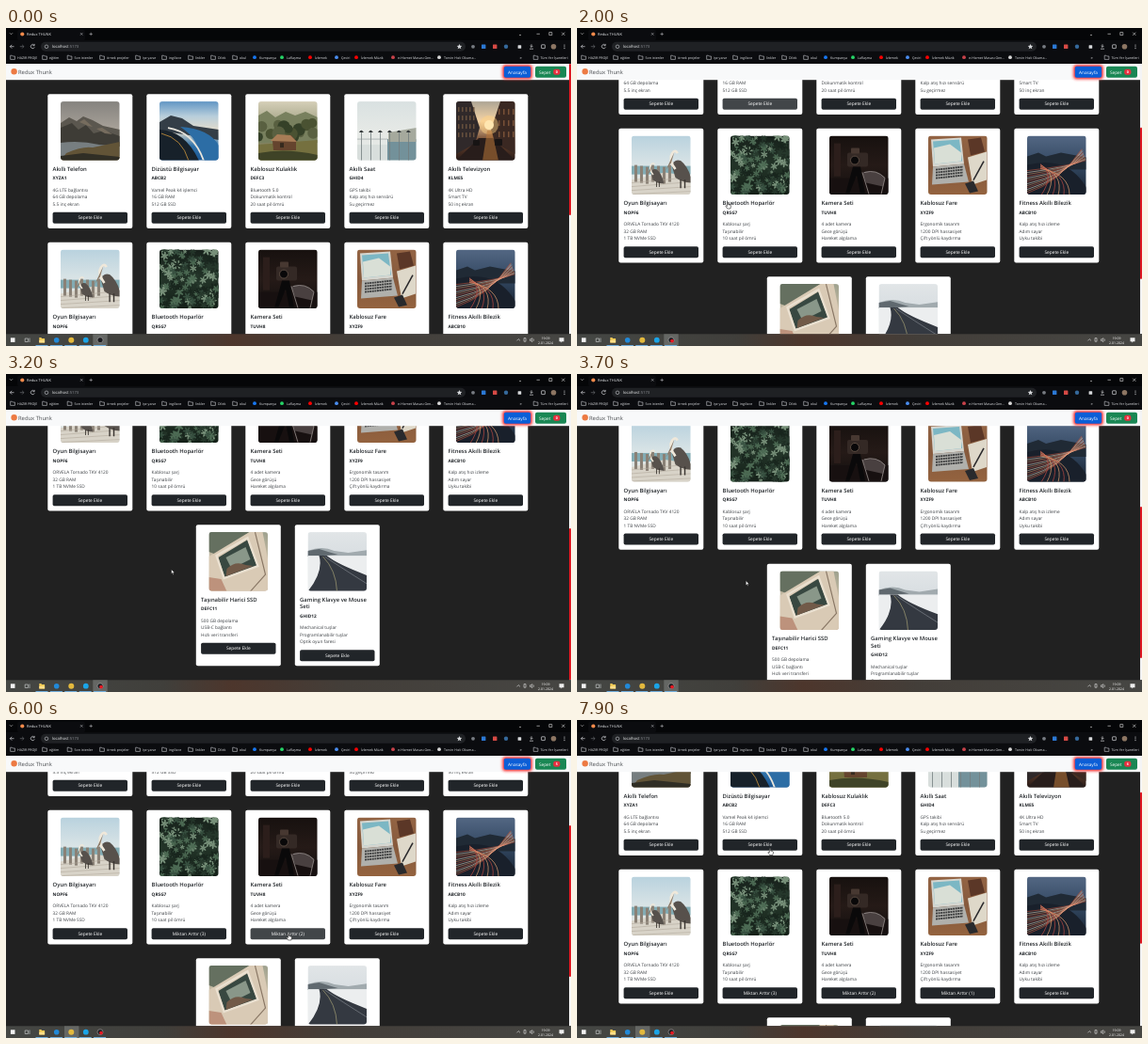
Write an HTML page that moves like this. It is 600 by 338 pixels and loops after 8 s.

```html
<!DOCTYPE html>
<html lang="tr">
<head>
<meta charset="utf-8">
<title>Redux Thunk</title>
<style>
html, body { margin: 0; width: 100%; height: 100%; overflow: hidden; background: #000; }
svg { display: block; width: 600px; height: 338px; font-family: "Open Sans", "Noto Sans", sans-serif; text-rendering: geometricPrecision; }
</style>
</head>
<body>
<svg id="stage" viewBox="0 0 600 338"></svg>
<script>
const LOOP = 8000, STEP = 100;

// Markup helpers
const rect = (x, y, w, h, fill, r = 0, more = '') =>
  `<rect x="${x}" y="${y}" width="${w}" height="${h}" fill="${fill}" rx="${r}" ${more}/>`;
const dot = (x, y, r, fill, more = '') => `<circle cx="${x}" cy="${y}" r="${r}" fill="${fill}" ${more}/>`;
const shape = (fill, d, more = '') => `<path d="${d}" fill="${fill}" ${more}/>`;
const line = (color, d, w = 0.7, more = '') =>
  `<path d="${d}" fill="none" stroke="${color}" stroke-width="${w}" ${more}/>`;
const text = (x, y, size, fill, str, more = '') =>
  `<text x="${x}" y="${y}" font-size="${size}" fill="${fill}" ${more}>${str}</text>`;
const many = (n, fn) => Array.from({ length: n }, (_, i) => fn(i)).join('');

let gradients = '', gradientCount = 0;
function fade(...colors) {
  const id = 'g' + gradientCount++;
  const stops = colors.map((c, i) => `<stop offset="${i / (colors.length - 1)}" stop-color="${c}"/>`).join('');
  gradients += `<linearGradient id="${id}" x2="0" y2="1">${stops}</linearGradient>`;
  return rect(0, 0, 63, 63, `url(#${id})`);
}

let seed = 7;
const rnd = () => (seed = (seed * 16807) % 2147483647) / 2147483647;

// Simple scenes, each 62.5 units square
const leaf = () => {
  const x = rnd() * 63, y = rnd() * 63, r = 1.5 + rnd() * 3, turn = rnd() * 60;
  const green = ['#26382c', '#375040', '#4d6b54', '#78917a', '#18251d'][Math.floor(rnd() * 5)];
  return `<g transform="translate(${x} ${y}) rotate(${turn})">` + many(6, i =>
    `<ellipse cx="${r * 0.6}" rx="${r * 0.6}" ry="${r * 0.24}" fill="${green}" transform="rotate(${i * 60})"/>`) + '</g>';
};
const pelican = (x, y, s) => `<g transform="translate(${x} ${y}) scale(${s})">` +
  shape('#57514c', 'M1 18Q2 10 9 12Q17 18 20 33Q11 33 4 28Z') +
  line('#efe8da', 'M4 20Q-3 11 1 5Q4 1 6 5', 2.4) +
  shape('#8d7a67', 'M3 4L-5 21L0 14Z') + line('#35302c', 'M9 30V38M13 30V38', 1.2) + '</g>';

const photos = [
  fade('#85837f', '#aaa39a', '#b1a79b') +
    shape('#5b574f', 'M0 23L9 17L17 21L24 16L34 20L45 26L63 30V48H0Z') +
    shape('#3e3c36', 'M0 28L12 23L19 30L27 25L35 34L46 31L63 37V48H0Z') +
    shape('#766c5e', 'M20 22L25 19L34 27L29 26ZM38 29L44 28L55 35L47 34Z') +
    shape('#777e80', 'M0 44Q20 41 41 46L63 48V58H0Z') +
    shape('#625437', 'M6 55Q24 47 34 49L63 43V63H0Z') + shape('#302e25', 'M0 58L24 55L63 59V63H0Z'),
  fade('#6296c4', '#b8cedb', '#e4dccb', '#2f72aa', '#1b5590') +
    shape('#343e47', 'M0 22L12 15L24 18L36 26L63 30V41L0 31Z') +
    shape('#2c6da5', 'M22 27Q53 29 63 47V63H46Q42 40 22 27Z') +
    shape('#17212a', 'M0 30Q27 31 42 63H0Z') +
    line('#e8e5dc', 'M9 28Q36 32 47 63', 1.8) + line('#cf963d', 'M2 34Q24 39 31 63', 0.8),
  fade('#d5cfb8', '#929474', '#6c6843') +
    shape('#78805e', 'M0 15L9 10L18 17L29 11L39 15L50 11L63 17V44H0Z') +
    many(18, i => dot(rnd() * 63, 22 + rnd() * 17, 4 + rnd() * 3, ['#354128', '#4a5232', '#596041'][i % 3])) +
    shape('#75703f', 'M0 46L63 41V63H0Z') + shape('#65442e', 'M15 42L20 36H35L40 42V52H16Z') +
    shape('#a77c56', 'M13 42L20 35L34 36L41 43Z') + rect(23, 44, 4, 5, '#35291e') +
    shape('#3f4327', 'M0 55Q29 49 63 57V63H0Z'),
  fade('#d9e1e1', '#e6e9e6', '#e2e6e3') + rect(32, 40, 31, 23, '#73919a') +
    shape('#a5a99d', 'M33 33L63 28V43H33Z') + rect(0, 46, 32, 17, '#d8dedc') +
    many(6, i => rect(4 + i * 10, 33, 0.8, 30, '#747d7f') + shape('#353a3b', `M${2 + i * 10} 33q2 -4 4 -1l1 1z`)) +
    line('#8c9496', 'M0 40H32', 0.6),
  fade('#ada595', '#f5d3a4', '#6b432d', '#261a18') +
    shape('#30292a', 'M0 0H16L25 28L20 45L0 56Z') + shape('#3a2822', 'M63 0H47L37 30L41 44L63 56Z') +
    dot(35, 25, 5, '#fff7d7') + dot(35, 25, 10, '#ffd180', 'opacity=".45"') +
    shape('#281d1b', 'M24 39H39L63 63H0Z') + shape('#b97739', 'M33 31H38L45 63H28Z', 'opacity=".55"') +
    many(20, i => rect(2 + i % 5 * 4, 6 + Math.floor(i / 5) * 9, 1.5, 5, '#67503d')) +
    many(12, i => rect(45 + i % 4 * 5, 8 + Math.floor(i / 4) * 12, 1.5, 6, '#795137')) +
    rect(18, 41, 7, 6, '#171414', 1) + rect(41, 40, 8, 7, '#171414', 1),
  fade('#b9d2de', '#dae4e6', '#e3e4df') + rect(0, 32, 63, 9, '#82abb3') +
    shape('#d8d3c8', 'M0 47L35 39L63 43V63H0Z') +
    many(7, i => rect(3 + i * 6, 31 + i % 3, 3, 18, '#8a8176')) +
    many(5, i => line('#b3aa9d', `M0 ${50 + i * 4}L63 ${44 + i * 5}`, 0.6)) +
    pelican(20, 27, 0.72) + pelican(42, 13, 1.12),
  fade('#17211b', '#233428', '#142018') + many(160, leaf),
  fade('#17110f', '#251a17', '#110e0e') + rect(0, 45, 63, 18, '#171010') +
    rect(19, 18, 22, 15, '#342925', 2) + dot(27, 26, 4.5, '#090809', 'stroke="#5a4b41"') +
    rect(23, 13, 9, 6, '#473831', 1) + shape('#0a090a', 'M25 33H33L38 62H33L29 42L21 62H17Z') +
    shape('#494040', 'M35 39Q48 35 59 44L57 54L39 50Z') + line('#8d8583', 'M35 39L42 62M37 39Q50 35 59 45L55 62', 0.9) +
    rect(5, 8, 7, 35, '#2c1e1b'),
  fade('#936444', '#865a3d', '#94633f') +
    shape('#d5d6d0', 'M3 4L35 2L38 30L5 33Z') + shape('#7cb7c4', 'M5 6L33 4L36 27L7 30Z') +
    shape('#d9dfd6', 'M6 13L23 9L35 18V27L7 30Z') + shape('#b0b0ac', 'M5 33L38 30L43 49L4 52Z') +
    many(4, i => line('#393a3b', `M8 ${36 + i * 3}L37 ${33 + i * 3}`, 1.8, 'stroke-dasharray="2 .6"')) +
    shape('#ded8c9', 'M42 23L62 17V47L47 52Z') + shape('#5b3727', 'M42 4L56 2L60 17L45 21Z') +
    line('#28272a', 'M48 47L59 27', 1.5) + shape('#292a2d', 'M39 51L48 48L53 59L44 61Z'),
  fade('#536783', '#324761', '#18222f') +
    shape('#202a35', 'M0 22L12 18L20 22L36 18L63 23V36H0Z') + shape('#19202b', 'M0 31Q42 20 63 55V63H0Z') +
    many(13, i => line(['#c2533d', '#df9165', '#f2ddc5'][i % 3],
      `M0 ${61 - i * 2}Q${34 + i} ${50 - i * 1.5} ${58 + i * 0.4} ${14 + i}`, 0.55)) +
    many(6, i => line(['#bd4a44', '#e2a070'][i % 2], `M${15 + i * 6} 63Q${30 + i * 3} 40 14 ${30 + i}`, 0.7)),
  fade('#9ea18e', '#cec1aa', '#bda58b') + shape('#657060', 'M0 0H43L8 24L0 21Z') +
    shape('#d9cab5', 'M0 26L43 0H57L63 31V63H0Z') + shape('#384841', 'M10 27L41 8L51 36L17 48Z') +
    shape('#899789', 'M18 27L39 16L44 29L24 39Z') + line('#eae0d0', 'M8 25L41 6L52 36L16 49Z', 2.3) +
    shape('#715a48', 'M19 39Q28 30 39 35L47 36L18 47Z') + shape('#bd927c', 'M0 48L13 50L19 63H0Z') +
    line('#8a7866', 'M49 0L60 45L44 63', 1.2),
  fade('#e1e5e7', '#d6dce0', '#f1f2f2') + shape('#a1aaae', 'M0 20Q15 14 28 20L43 22L63 19V26H0Z') +
    shape('#60696f', 'M0 20L12 18L25 22L32 24L0 26Z') + rect(0, 25, 63, 38, '#eceeef') +
    shape('#343941', 'M12 25H20Q31 34 63 46V63H0Q17 42 12 25Z') +
    line('#b8b17f', 'M16 26Q30 40 31 63', 0.6) + line('#999fa5', 'M18 26Q36 38 63 55', 0.5)
];

// Products: title lines, code, features
const products = [
  ['Akıllı Telefon', 'XYZA1', '4G LTE bağlantısı|64 GB depolama|5.5 inç ekran'],
  ['Dizüstü Bilgisayar', 'ABCB2', 'Vamel Peak k4 işlemci|16 GB RAM|512 GB SSD'],
  ['Kablosuz Kulaklık', 'DEFC3', 'Bluetooth 5.0|Dokunmatik kontrol|20 saat pil ömrü'],
  ['Akıllı Saat', 'GHID4', 'GPS takibi|Kalp atış hızı sensörü|Su geçirmez'],
  ['Akıllı Televizyon', 'KLME5', '4K Ultra HD|Smart TV|50 inç ekran'],
  ['Oyun Bilgisayarı', 'NOPF6', 'ORVELA Tornado TKV 4120|32 GB RAM|1 TB NVMe SSD'],
  ['Bluetooth Hoparlör', 'QRSG7', 'Kablosuz şarj|Taşınabilir|10 saat pil ömrü'],
  ['Kamera Seti', 'TUVH8', '4 adet kamera|Gece görüşü|Hareket algılama'],
  ['Kablosuz Fare', 'XYZF9', 'Ergonomik tasarım|1200 DPI hassasiyet|Çift yönlü kaydırma'],
  ['Fitness Akıllı Bilezik', 'ABCB10', 'Kalp atış hızı izleme|Adım sayar|Uyku takibi'],
  ['Taşınabilir Harici SSD', 'DEFC11', '500 GB depolama|USB-C bağlantı|Hızlı veri transferi'],
  ['Gaming Klavye ve Mouse|Seti', 'GHID12', 'Mechanical tuşlar|Programlanabilir tuşlar|Optik oyun faresi']
];

function card([title, code, features], i) {
  const row = Math.floor(i / 5), x = 44.3 + (i % 5) * 105 + (row === 2 ? 157.5 : 0), y = 70.3 + row * 157.5;
  const titles = title.split('|'), drop = (titles.length - 1) * 7.5;
  return `<g transform="translate(${x} ${y})">` +
    rect(0, 0, 90, row === 2 ? 150 : 142.7, '#fff', 2) +
    `<g transform="translate(13.7 7.8)" clip-path="url(#photo)">${photos[i]}</g>` +
    titles.map((s, n) => text(5.3, 81.5 + n * 7.5, 5.9, '#212529', s, 'font-weight="600"')).join('') +
    text(5.3, 91.1 + drop, 4.75, '#212529', code, 'font-weight="700"') +
    features.split('|').map((s, n) => text(5.3, 103.4 + drop + n * 7.5, 4.75, '#3b3f43', s)).join('') +
    rect(5.3, 125.4 + drop, 79.4, 12, '#212529', 1.8, 'class="btn"') +
    text(45, 133 + drop, 4.8, '#fff', 'Sepete Ekle', 'text-anchor="middle" class="label"') + '</g>';
}

// Browser chrome
const folder = x => line('#c9cbd0', `M${x - 2.3} 29.2h1.7l.8 .8h2.2v3.4h-4.7z`, 0.6);
const bookmarks = [
  [7, 'HAZIR PROJE'], [41, 'eğitim'], [67.5, 'Son istenler'], [102, 'örnek projeler'], [140, 'işe yarar'],
  [168, 'ingilizce'], [196, 'linkler'], [220, 'Dilek'], [243, 'okul'],
  [264, 'Kumpanya', '#1877f2'], [293, 'Laflaşma', '#25d366'], [323, 'İzlemek', '#f00'], [351, 'Çeviri', '#4a8df0'],
  [372, 'İzlemek Müzik', '#f00'], [411, 'e-Hizmet Masası Gen...', '#c8424a'],
  [460, 'Torvin Hızlı Okuma...', '#d7d7d7'], [562.5, 'Tüm Yer İşaretleri']
];
const chrome = () => rect(0, 0, 600, 38, '#050608') + rect(12, 1.5, 72, 12, '#0b0c0f', 3) +
  rect(0, 13, 600, 25, '#0b0c0f') +
  line('#ddd', 'M4 5.3l1.5 1.5l1.5 -1.5', 0.6) + dot(17.3, 6.5, 2.1, '#f08a4b') +
  text(22, 8, 3.95, '#e8eaed', 'Redux THUNK') +
  line('#d5d7da', 'M79 5.2l2.4 2.4m0 -2.4l-2.4 2.4M88.5 6.4h3.4m-1.7 -1.7v3.4', 0.5) +
  line('#e3e3e3', 'M545 7l1 1l1 -1M563.5 6.3h3.4M576.8 4.6h3v3h-3zM590.2 4.7l3.2 3.2m0 -3.2l-3.2 3.2', 0.6) +
  rect(37, 14.8, 451, 10, '#1f2124', 5) +
  line('#d0d2d6', 'M8.5 19.7h-4.2m1.9 -1.9l-1.9 1.9l1.9 1.9', 0.7) +
  line('#66696e', 'M14.8 19.7h4.2m-1.9 -1.9l1.9 1.9l-1.9 1.9', 0.7) +
  line('#d0d2d6', 'M30 18.3a2.1 2.1 0 1 0 .3 2.1M30.2 16.9v1.8h-1.8', 0.7) +
  dot(43, 19.8, 1.8, 'none', 'stroke="#c9cbd0" stroke-width=".6"') +
  text(49, 21.2, 4.2, '#f1f3f4', 'localhost<tspan fill="#8e9196">:5173</tspan>') +
  shape('#d5d7da', 'M481.5 17l.8 1.8l2 .2l-1.5 1.3l.5 2l-1.8 -1.1l-1.8 1.1l.5 -2l-1.5 -1.3l2 -.2z') +
  dot(496, 19.8, 1.9, '#777b82') + rect(505, 17.6, 4.4, 4.4, '#2b78d4', 0.5) +
  rect(517, 17.6, 4.4, 4.4, '#d64a45', 0.5) + dot(531, 19.8, 2.2, '#35699b') +
  rect(543.6, 18.2, 3.6, 3.6, '#d7d9dc', 0.6) + line('#d7d9dc', 'M558 17.3v3m-1.4 -1.3l1.4 1.4l1.4 -1.4M556 22.2h4', 0.7) +
  rect(568.6, 17.8, 3.8, 3.8, 'none', 0.4, 'stroke="#d7d9dc" stroke-width=".7"') +
  dot(581.5, 19.8, 2.8, '#8d7663') + many(3, i => dot(593, 18 + i * 1.8, 0.55, '#d7d9dc')) +
  bookmarks.map(([x, s, c]) => (c ? dot(x, 31.2, 1.9, c) : folder(x)) + text(x + 5, 32.5, 3.6, '#e6e8eb', s)).join('') +
  text(545.5, 32.6, 4.5, '#d9dbde', '»');

const navbar = () => rect(0, 38, 598, 17.2, '#f8f9fa') + dot(8.6, 46.2, 3.2, '#ed7a43') +
  text(13, 48.7, 5.85, '#484b4f', 'Redux Thunk') +
  rect(527.3, 39.3, 31.4, 15, '#ff2020', 3, 'filter="url(#glow)"') + rect(528.8, 40.8, 28.4, 12, '#0b5ed7', 2) +
  text(543, 48.5, 4.7, '#fff', 'Anasayfa', 'text-anchor="middle"') +
  rect(562, 40.8, 33, 12, '#198754', 2) + text(566, 48.5, 4.7, '#fff', 'Sepet') +
  rect(581.2, 43.8, 7.2, 6, '#e62f3f', 2.2) +
  text(584.8, 48.2, 3.7, '#fff', '0', 'id="badge" font-weight="700" text-anchor="middle"');

const taskbar = () => rect(0, 325.3, 600, 12.7, 'url(#bar)') +
  rect(62, 325.3, 15.4, 12.7, '#656764', 0, 'id="focusBrowser"') +
  rect(92.3, 325.3, 15.4, 12.7, '#656764', 0, 'id="focusRecorder"') +
  rect(4.9, 329.3, 4.6, 4.6, '#f2f2f2') +
  line('#d6d8d8', 'M20.2 330h3.2v3.5h-3.2zM25 329.5v4.5', 0.6) +
  shape('#f3ca55', 'M35.3 329h2l.8 1h3v4.4h-5.8z') + rect(35.3, 331.8, 5.8, 2.6, '#ffe08b') +
  dot(53.7, 331.7, 2.8, '#2189d8') + dot(69.3, 331.7, 3, '#e3b93d') +
  dot(84.8, 331.7, 2.9, '#1aa4e7') + dot(100, 331.7, 3, '#1c1c1f', 'stroke="#bcbcbe" stroke-width=".5"') +
  dot(101, 332.6, 1.9, '#e81822', 'id="rec"') +
  many(5, i => rect(31.5 + i * 15.4, 337.1, 13, 0.9, '#76b9ed')) +
  line('#e6e6e6', 'M542.4 332.4l1.8 -1.8l1.8 1.8M550 329.6h2v3.6h-2zM556.5 330.8h1l1.2 -1.2v4l-1.2 -1.2h-1zM560 330.4q1 1.2 0 2.4', 0.6) +
  text(573, 330.7, 3.5, '#fff', '19:09', 'text-anchor="middle"') +
  text(573, 336.3, 3.5, '#fff', '2.01.2024', 'text-anchor="middle"') +
  shape('#eee', 'M587.5 329.3h5v4h-2l-1.2 1.3v-1.3h-1.8z');

const cursors = `<g id="cursor" stroke="#000" stroke-width=".5" stroke-linejoin="round">
  <path id="arrow" fill="#fff" d="M0 0V5.2L1.2 4.1L2 5.9L2.8 5.5L2 3.8H3.7Z"/>
  <path id="hand" fill="#fff" d="M-.6 .5Q0 -.4 .6 .5V2.6L3 3.2Q3.7 3.5 3.5 4.4L2.9 7H-.4L-2.1 4.4Q-2.2 3.5 -1.2 3.9L-.6 4.5Z"/></g>`;

const cards = products.map(card).join('');
const stage = document.getElementById('stage');
stage.innerHTML = `<defs>${gradients}
  <clipPath id="photo"><rect width="62.5" height="62.5" rx="3"/></clipPath>
  <clipPath id="view"><rect y="38" width="600" height="287.3"/></clipPath>
  <filter id="glow" x="-30%" y="-60%" width="160%" height="220%"><feGaussianBlur stdDeviation="1.6"/></filter>
  <linearGradient id="bar"><stop stop-color="#454744"/><stop offset=".28" stop-color="#403f3b"/>
    <stop offset=".4" stop-color="#4d362c"/><stop offset=".6" stop-color="#433e39"/><stop offset="1" stop-color="#464643"/></linearGradient>
  </defs>` +
  rect(0, 38, 600, 288, '#212121') + `<g clip-path="url(#view)"><g id="page">${cards}</g></g>` +
  navbar() + rect(598, 38, 2, 287.3, '#f4f4f4') + rect(598, 38, 2, 161, '#dc1620', 0.9, 'id="thumb"') +
  chrome() + taskbar() + cursors;

// Timeline: [time, values...]
const scrollSteps = [[0, 0], [1350, 0], [1700, 58], [2000, 121], [2500, 225], [3300, 225], [4200, 132], [7100, 132], [7200, 126], [7900, 69]];
const cursorSteps = [[100, 112, 316], [900, 163, 200], [1350, 160.5, 185], [2000, 160, 185], [2600, 160, 185],
  [3200, 175.5, 207.5], [3800, 180, 222], [4600, 189, 225.5], [5150, 189, 225.5], [5550, 298, 227], [6000, 300, 227],
  [6500, 402, 228], [6900, 402, 228], [7200, 356, 207], [7900, 205, 136.5]];
const hovers = [[900, 2600, 1], [4100, 5300, 6], [5400, 6200, 7], [6400, 7000, 8], [7700, 8000, -1]];
const clicks = [[4600, 6], [4900, 6], [5200, 6], [5600, 7], [5900, 7], [6700, 8]];

function at(steps, t) {
  if (t <= steps[0][0]) return steps[0].slice(1);
  const n = steps.findIndex(s => s[0] >= t);
  if (n < 0) return steps[steps.length - 1].slice(1);
  const a = steps[n - 1], b = steps[n], k = (t - a[0]) / (b[0] - a[0]);
  return a.slice(1).map((v, i) => v + (b[i + 1] - v) * k);
}

const el = id => document.getElementById(id);
const show = (id, on) => el(id).setAttribute('visibility', on ? 'visible' : 'hidden');
const buttons = [...stage.querySelectorAll('.btn')], labels = [...stage.querySelectorAll('.label')];

function draw(t) {
  const [scroll] = at(scrollSteps, t), [x, y] = at(cursorSteps, t);
  el('page').setAttribute('transform', `translate(0 ${-scroll})`);
  el('thumb').setAttribute('y', 38 + scroll * 0.5605);

  const hover = hovers.find(([from, to]) => t >= from && t < to);
  const done = clicks.filter(c => c[0] <= t);
  buttons.forEach((b, i) => {
    b.setAttribute('fill', hover && hover[2] === i ? '#424649' : '#212529');
    const count = done.filter(c => c[1] === i).length;
    labels[i].textContent = count ? `Miktarı Arttır (${count})` : 'Sepete Ekle';
  });
  el('badge').textContent = done.length;

  el('cursor').setAttribute('transform', `translate(${x} ${y})`);
  show('hand', t >= 100 && hover);
  show('arrow', t >= 100 && !hover);
  show('rec', t >= 300);
  show('focusBrowser', done.length > 0);
  show('focusRecorder', done.length === 0);
}

const start = performance.now();
function tick() {
  const t = (performance.now() - start) % LOOP;
  draw(Math.floor(t / STEP) * STEP);
  requestAnimationFrame(tick);
}
tick();
</script>
</body>
</html>
```
